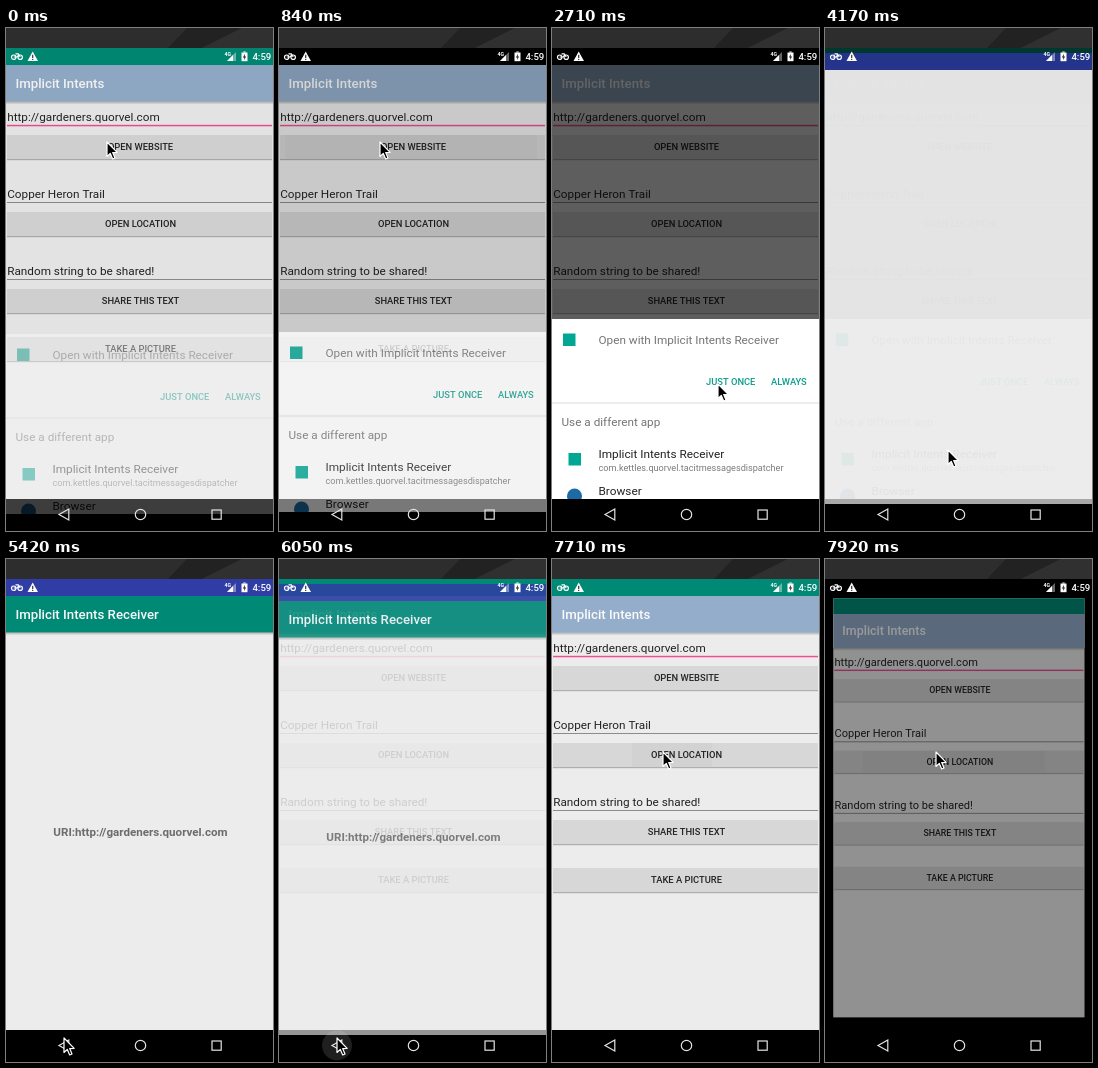
Animation, 267 px wide and 503 px high, one loop 8 s. Source, as an HTML page with a canvas:

```html
<!DOCTYPE html>
<html lang="en">
<head>
<meta charset="utf-8">
<style>
html, body { margin: 0; width: 100%; height: 100%; overflow: hidden; background: #000; }
canvas { display: block; width: 100%; height: 100%; }
</style>
</head>
<body>
<canvas id="stage"></canvas>
<script>
const W = 267, H = 503, LOOP = 8000, TOP = 20, NAV = 471;
const SITE = 'http://gardeners.quorvel.com';
const TEAL = '#008a76', ICON = '#00a794', PAPER = '#ececec';
const stage = document.getElementById('stage');
const screen = stage.getContext('2d');
const buffer = document.createElement('canvas').getContext('2d');
let ctx = screen;

// Each entry holds until the next one; missing values fall back to REST.
const REST = { dim: 0, sheet: 0, drop: 0, black: false, recv: 0, slide: 0, ready: true,
  press: null, shrunk: false, caret: false, back: 0 };
const scenes = [
  [0, { dim: .04, sheet: .4, drop: 15 }],
  [210, { dim: .04 }],
  [840, { dim: .15, sheet: .78, drop: 13, black: true, press: [107, 6, 258] }],
  [1040, { dim: .42, sheet: 1, drop: 3, black: true }],
  [1250, { dim: .6, sheet: 1, black: true }],
  [3330, { dim: .6, sheet: 1, recv: .1, slide: 5, ready: false }],
  [3540, { dim: .6, sheet: 1, recv: .3, slide: 5, ready: false }],
  [3750, { dim: .6, sheet: 1, recv: .55, slide: 5, ready: false }],
  [3960, { dim: .6, sheet: 1, recv: .8, slide: 5, ready: false }],
  [4170, { dim: .6, sheet: 1, recv: .95, slide: 5, ready: false }],
  [4380, { recv: 1, ready: false }],
  [4590, { recv: 1 }],
  [5840, { recv: 1, back: .25 }],
  [6050, { recv: .85, slide: 5, back: .12 }],
  [6260, { recv: .45, slide: 17 }],
  [6470, { recv: .12, slide: 31 }],
  [6680, {}],
  [6880, { caret: true }],
  [7080, {}],
  [7710, { press: [184, 80, 160] }],
  [7920, { dim: .39, black: true, press: [184, 31, 225], shrunk: true }]
];

const pointer = [
  [0, 101, 114], [1250, 112, 160], [1460, 136, 245], [1670, 160, 325], [1870, 176, 361],
  [2710, 166, 356], [2920, 123, 422], [5000, 112, 438], [5210, 82, 464], [5420, 58, 479],
  [6470, 66, 430], [6680, 84, 315], [6880, 101, 212], [7080, 106, 203], [7290, 111, 193]
];

const held = (list, t) => list.filter(e => e[0] <= t).pop();

function rect(x, y, w, h, fill) {
  ctx.fillStyle = fill;
  ctx.fillRect(x, y, w, h);
}

function disc(x, y, r, fill) {
  ctx.fillStyle = fill;
  ctx.beginPath();
  ctx.arc(x, y, r, 0, 7);
  ctx.fill();
}

function poly(points, fill, stroke, width = 1) {
  ctx.beginPath();
  points.forEach(([x, y]) => ctx.lineTo(x, y));
  ctx.closePath();
  if (fill) { ctx.fillStyle = fill; ctx.fill(); }
  if (stroke) { ctx.strokeStyle = stroke; ctx.lineWidth = width; ctx.stroke(); }
}

function text(str, x, y, size, fill, weight = 400, align = 'left') {
  ctx.font = `${weight} ${size}px Roboto, sans-serif`;
  ctx.textAlign = align;
  ctx.fillStyle = fill;
  ctx.fillText(str, x, y);
}

function shade(y, h, alpha) {
  const g = ctx.createLinearGradient(0, y, 0, y + h);
  g.addColorStop(0, `rgba(0,0,0,${alpha})`);
  g.addColorStop(1, 'rgba(0,0,0,0)');
  rect(0, y, W, h, g);
}

// Paints a group on its own surface, then blends it as one.
// The part that slides over the navigation bar is darkened.
function layer(alpha, dy, scrim, paint) {
  if (!alpha) return;
  buffer.setTransform(1, 0, 0, 1, 0, 0);
  buffer.clearRect(0, 0, stage.width, stage.height);
  buffer.setTransform(stage.width / W, 0, 0, stage.height / H, 0, 0);
  ctx = buffer;
  paint();
  ctx = screen;
  ctx.globalAlpha = alpha;
  ctx.drawImage(buffer.canvas, 0, dy, W, H);
  ctx.globalAlpha = 1;
  rect(0, NAV, W, dy, `rgba(0,0,0,${scrim})`);
}

function toolbar(title, status, fill) {
  rect(0, TOP, W, NAV - TOP, PAPER);
  rect(0, TOP, W, 17, status);
  rect(0, 37, W, 36.5, fill);
  shade(73.5, 3, .25);
  text(title, 9.5, 60, 13.25, '#fafafa', 500);
}

function field(str, y, line, thick) {
  text(str, 1.2, y, 11.75, '#222');
  rect(1, y + 4.3, W - 2, thick, line);
}

function button(label, y) {
  rect(1, y + 1, W - 2, 24.5, 'rgba(0,0,0,.1)');
  rect(1, y + 24, W - 2, 1, 'rgba(0,0,0,.18)');
  rect(1, y, W - 2, 24, '#d6d7d6');
  text(label, 134.5, y + 15.4, 9.35, '#222', 500, 'center');
}

function drawApp(s) {
  ctx.save();
  if (s.shrunk) {
    rect(0, TOP, W, NAV - TOP, '#000');
    ctx.translate(8.4, 20.7);
    ctx.scale(.94, .929);
  }
  toolbar('Implicit Intents', TEAL, '#93adca');
  field(SITE, 92.5, '#ec4f93', 1.5);
  if (s.caret) rect(1.5, 81, 1, 15, '#ec4f93');
  field('Copper Heron Trail', 169.7, '#8c8c8c', 1);
  field('Random string to be shared!', 246.7, '#8c8c8c', 1);
  button('OPEN WEBSITE', 107);
  button('OPEN LOCATION', 184);
  button('SHARE THIS TEXT', 261);
  button('TAKE A PICTURE', 309);
  if (s.press) {
    const [y, x0, x1] = s.press;
    rect(x0, y, x1 - x0, 24, 'rgba(0,0,0,.025)');
  }
  rect(0, TOP, W, NAV - TOP, `rgba(0,0,0,${s.dim})`);
  ctx.restore();
  if (s.black) rect(0, TOP, W, 17, '#000');
}

function drawSheet() {
  ctx.save();
  ctx.beginPath();
  ctx.rect(0, 291, W, NAV - 291);
  ctx.clip();
  rect(0, 291, W, 180, '#fff');
  rect(11, 305.5, 12.5, 12.5, ICON);
  text('Open with Implicit Intents Receiver', 46.5, 316, 11.75, '#757575');
  text('JUST ONCE', 154, 357.3, 9.35, '#0a9c8b', 500);
  text('ALWAYS', 219, 357.3, 9.35, '#0a9c8b', 500);
  rect(0, 374.5, W, 1, '#dcdcdc');
  text('Use a different app', 9.5, 398.3, 11.75, '#757575');
  rect(16.5, 425, 12.5, 12.5, ICON);
  text('Implicit Intents Receiver', 46.5, 429.5, 11.8, '#222');
  text('com.kettles.quorvel.tacitmessagesdispatcher', 46.5, 442.5, 9.15, '#7c7c7c');
  disc(22.5, 468, 7.5, '#1c6ba5');
  text('Browser', 46.5, 466.5, 11.8, '#222');
  ctx.restore();
}

function drawReceiver(ready) {
  if (ready) {
    toolbar('Implicit Intents Receiver', '#303da5', TEAL);
    text('URI:' + SITE, 134.5, 276.5, 11.6, '#6c6c6c', 700, 'center');
  } else {
    rect(0, TOP, W, NAV - TOP, PAPER);
    rect(0, TOP, W, 17, '#26348f');
  }
}

function drawBackdrop() {
  rect(0, 0, W, H, '#000');
  rect(0, 0, W, TOP, '#2d2d2d');
  poly([[162, 20], [181, 0], [236, 0], [196, 20]], '#222');
  poly([[196, 20], [236, 0], [W, 0], [W, 20]], '#303030');
}

function drawNav(back) {
  const line = '#e4e4e4';
  if (back) disc(58, 486.5, 15, `rgba(255,255,255,${back})`);
  poly([[53, 486.5], [62.8, 481], [62.8, 492]], null, line, 1.2);
  ctx.beginPath();
  ctx.arc(134.5, 486.5, 5.2, 0, 7);
  ctx.stroke();
  ctx.strokeRect(206, 482, 9.2, 9.2);
}

function drawStatus() {
  const ink = '#fff';
  ctx.strokeStyle = ink;
  ctx.lineWidth = 1.2;
  for (const x of [7.7, 14.2]) {
    ctx.beginPath();
    ctx.arc(x, 29.2, 2.2, 0, 7);
    ctx.stroke();
  }
  ctx.beginPath();
  ctx.moveTo(7.7, 29); ctx.lineTo(11, 29); ctx.lineTo(13, 26.5);
  ctx.moveTo(9.5, 25.8); ctx.lineTo(12.3, 25.8); ctx.lineTo(14.2, 29);
  ctx.stroke();
  poly([[21.5, 33], [26.7, 23.5], [32, 33]], ink);
  rect(26.1, 26.8, 1.2, 3.2, '#333');
  rect(26.1, 30.8, 1.2, 1.2, '#333');

  text('4G', 218.5, 28, 5.2, ink, 700);
  poly([[221, 33], [230, 24], [230, 33]], 'rgba(255,255,255,.4)');
  poly([[221, 33], [227, 27], [227, 33]], ink);
  rect(235.5, 24.5, 6, 8.7, ink);
  rect(237.3, 23.5, 2.4, 1, ink);
  poly([[239, 25.8], [236.8, 29.4], [238.2, 29.4], [238, 32], [240.2, 28.4], [238.8, 28.4]], '#333');
  text('4:59', 265.3, 32.3, 9.6, ink, 500, 'right');
}

function drawPointer(x, y) {
  const shape = [[0, 0], [0, 14.5], [3.3, 11.4], [5.7, 17], [8, 16], [5.7, 10.6], [10.2, 10.4]];
  ctx.lineJoin = 'round';
  poly(shape.map(([a, b]) => [x + a, y + b]), '#000', '#fff', 1.2);
  ctx.lineJoin = 'miter';
}

function fit() {
  const dpr = window.devicePixelRatio || 1;
  const w = Math.round(innerWidth * dpr), h = Math.round(innerHeight * dpr);
  if (stage.width === w && stage.height === h) return;
  stage.width = buffer.canvas.width = w;
  stage.height = buffer.canvas.height = h;
}

function frame(now) {
  fit();
  const t = now % LOOP;
  const s = { ...REST, ...held(scenes, t)[1] };
  const [, px, py] = held(pointer, t);
  ctx.setTransform(stage.width / W, 0, 0, stage.height / H, 0, 0);
  drawBackdrop();
  drawApp(s);
  layer(s.sheet, s.drop, .4, drawSheet);
  layer(s.recv, s.slide, .25, () => drawReceiver(s.ready));
  drawNav(s.back);
  drawStatus();
  drawPointer(px, py);
  requestAnimationFrame(frame);
}

requestAnimationFrame(frame);
</script>
</body>
</html>
```
